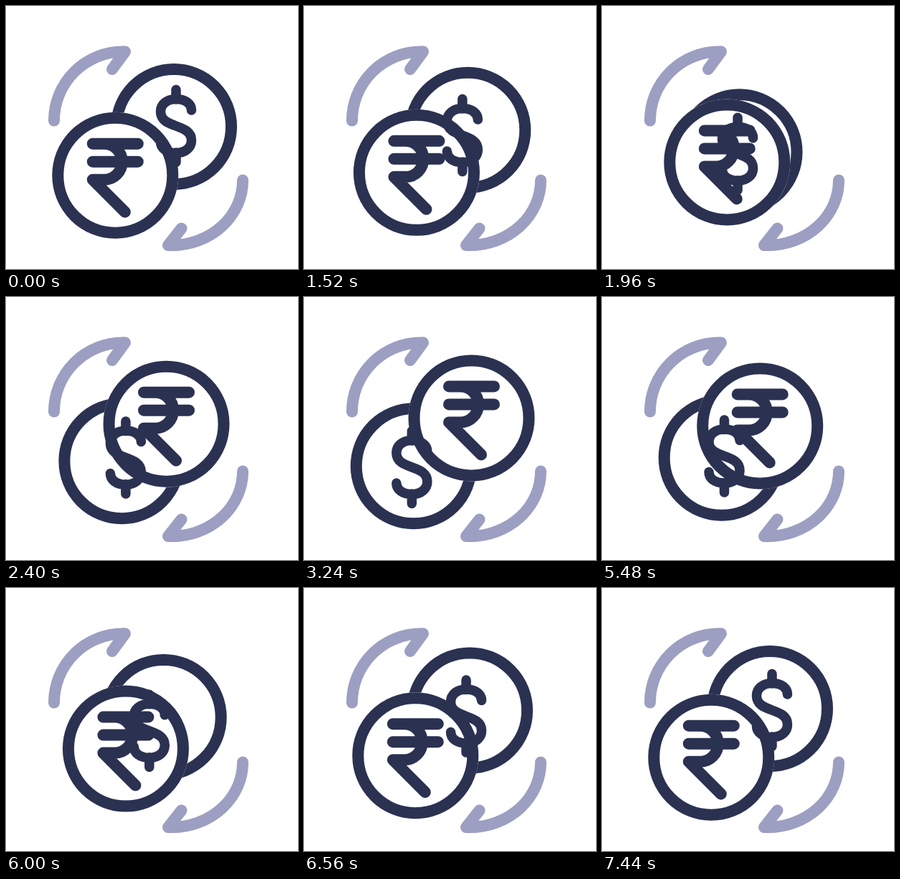
An HTML page for the animation above (8160 ms loop, 407 px wide and 366 px high).

```html
<!DOCTYPE html>
<html lang="en">
<head>
<meta charset="utf-8">
<title>Currency exchange</title>
<style>
  html, body { margin: 0; width: 100%; height: 100%; overflow: hidden; background: #fff; }
  svg { display: block; width: 100vw; height: 100vh; }
  .line { fill: none; stroke: #2b3151; stroke-width: 16; stroke-linecap: round; stroke-linejoin: round; }
  .arrow { stroke: #9c9fc1; }
  .dollar { stroke-width: 13.5; }
  .disc { fill: #fff; }
</style>
</head>
<body>
<svg viewBox="0 0 407 366">
  <path class="line arrow" d="M67 159.5A96.500 96 0 0 1 163.500 63.500H166L148 88"/>
  <path class="line arrow" d="M330 242.500A99 90.500 0 0 1 231 333H226L244.500 309.500"/>
  <g id="back">
    <circle class="disc" r="88"/>
    <circle class="line" r="80"/>
  </g>
  <g id="front">
    <circle class="disc" r="88"/>
    <circle class="line" r="80"/>
    <path class="line" d="M-31.500 -44H31.500M-31.500 -19H31.500M-31.500 -44H-15.500A25 25 0 0 1 -15.500 6H-31.500L13.500 51"/>
  </g>
  <path id="dollar" class="line dollar" d="M0 -50.500V-37M0 37V50.500M21.500 -22C21.500 -31 13 -37.500 0 -37.500C-13 -37.500 -21.500 -30 -21.500 -20C-21.500 -8 -11 -4 0 0C11 4 21.500 8 21.500 20C21.500 30 13 37.500 0 37.500C-13 37.500 -21.500 31 -21.500 22"/>
</svg>
<script>
  const LOOP = 8160, GO = 720, BACK = 4080;
  const LOW = [152.3, 235.7], HIGH = [234, 168];
  const SIGN_START = [237, 167], SIGN_LOW = [146.8, 239.8], SIGN_END = [237, 170];
  const byId = id => document.getElementById(id);
  const back = byId('back'), front = byId('front'), dollar = byId('dollar');

  // Cubic Bezier easing, solved by bisection
  function bezier(x1, y1, x2, y2) {
    const at = (a, b, s) => 3 * a * s * (1 - s) ** 2 + 3 * b * s * s * (1 - s) + s ** 3;
    return x => {
      if (x <= 0) return 0;
      if (x >= 1) return 1;
      let lo = 0, hi = 1;
      for (let i = 0; i < 30; i++) {
        const mid = (lo + hi) / 2;
        if (at(x1, x2, mid) < x) lo = mid; else hi = mid;
      }
      return at(y1, y2, lo);
    };
  }

  const frontGo = bezier(.86, 0, .04, 1), frontBack = bezier(.98, .1, .08, 1);
  const backGo = bezier(.8, 0, .01, 1), backBack = bezier(.98, .12, .08, 1);
  const signGo = bezier(.44, 0, .18, 1), signBack = bezier(.61, 0, .48, 1);

  function place(el, from, to, p) {
    const [x, y] = from.map((v, i) => v + (to[i] - v) * p);
    el.setAttribute('transform', `translate(${x.toFixed(3)} ${y.toFixed(3)})`);
  }

  function draw(t) {
    if (t < BACK) {
      const go = t - GO;
      place(front, LOW, HIGH, frontGo(go / 2880));
      place(back, HIGH, LOW, backGo(go / 2880));
      place(dollar, SIGN_START, SIGN_LOW, signGo(go / 3360));
    } else {
      const ret = (t - BACK) / 3360;
      place(front, HIGH, LOW, frontBack(ret));
      place(back, LOW, HIGH, backBack(ret));
      place(dollar, SIGN_LOW, SIGN_END, signBack(ret));
    }
  }

  const start = performance.now();
  function tick() {
    draw((performance.now() - start) % LOOP);
    requestAnimationFrame(tick);
  }
  tick();
</script>
</body>
</html>
```
